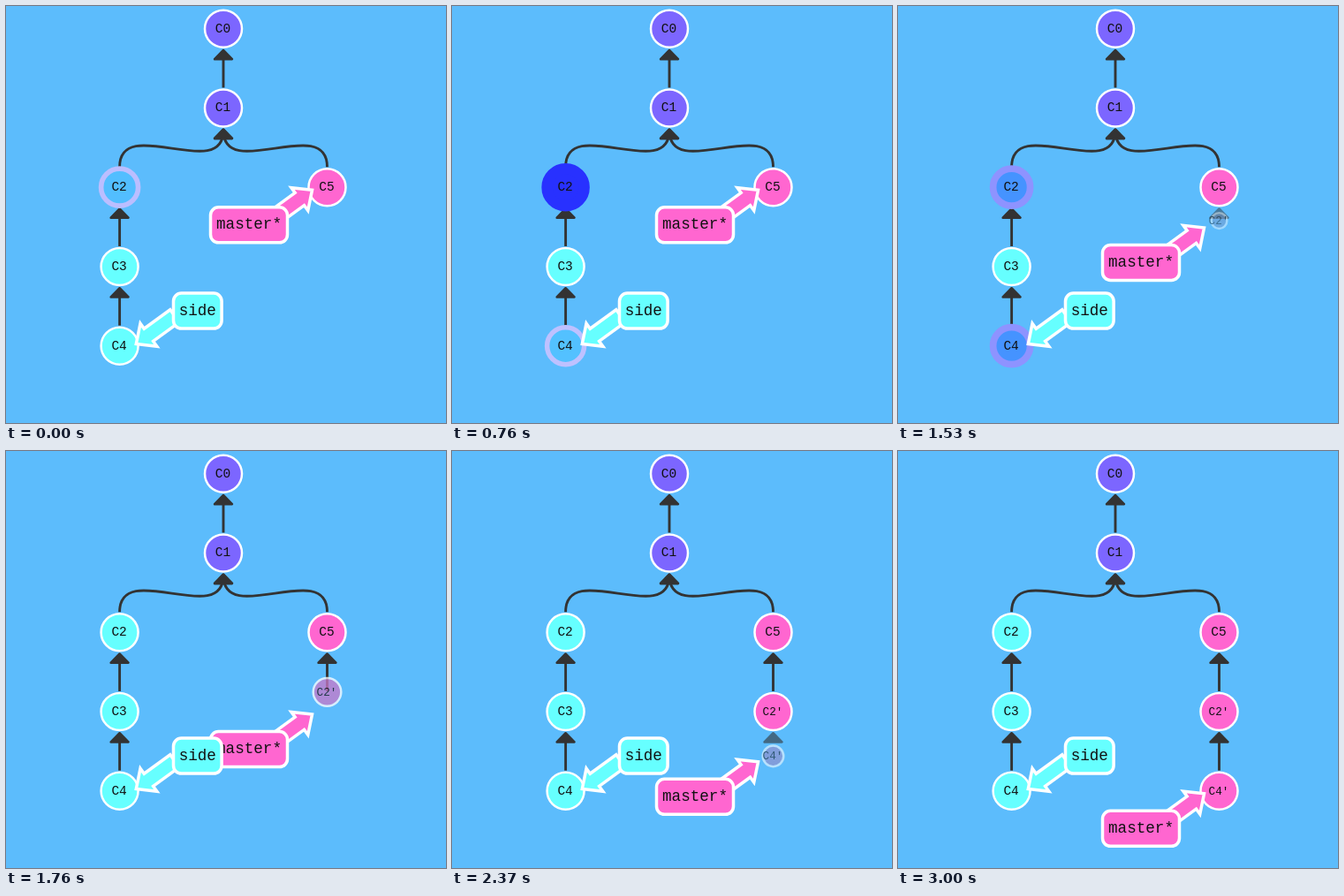
An HTML page for the animation above (4010 ms loop, 498 by 472 pixels).

```html
<!DOCTYPE html>
<html lang="en">
<head>
<meta charset="utf-8">
<title>Commit tree</title>
<style>
  html, body { margin: 0; width: 100%; height: 100%; overflow: hidden; background: #5cbcfc; }
  svg { display: block; width: 498px; height: 472px; }
  text { font-family: "Courier New", "Liberation Mono", monospace; text-anchor: middle; fill: #111; }
</style>
</head>
<body>
<svg id="stage" viewBox="0 0 498 472"></svg>
<script>
const LOOP = 4010;
const ROW = 89.75, TOP = 25.7;
const LEFT = 128.6, MID = 246, RIGHT = 363.5;
const R = 21, LINE = 2.5;
const PURPLE = [124, 102, 255], CYAN = [102, 255, 255], PINK = [255, 102, 208];
const TEAL = [36, 178, 178], BLUE = [40, 49, 255], WHITE = [255, 255, 255];

// Steady picture rate inside each active stretch: start, end, intervals.
const STRETCHES = [[70, 300, 3], [600, 1070, 6], [1370, 1840, 6], [1910, 2370, 6], [2450, 2920, 6], [3000, 3000, 0]];
const GLOW = 500, MOVE = 400, BOUNCE = 800, LAG = 5;
const GLOW_A = -195, GLOW_B = 570, BIRTH_A = 1336, BIRTH_B = 2147;

const stage = document.getElementById('stage');
const rowY = k => TOP + ROW * k;
const clamp = n => Math.min(1, Math.max(0, n));
const mix = (a, b, p) => a + (b - a) * p;
const rgb = c => `rgb(${c.map(Math.round).join()})`;
const mixColor = (a, b, p) => rgb(a.map((v, i) => mix(v, b[i], p)));

function add(parent, tag, attrs, label) {
  const el = document.createElementNS('http://www.w3.org/2000/svg', tag);
  set(el, attrs);
  if (label) el.textContent = label;
  return parent.appendChild(el);
}

function set(el, attrs) {
  for (const key in attrs) el.setAttribute(key, attrs[key]);
}

function easeInOut(n) {
  if (n <= 0 || n >= 1) return clamp(n);
  const q = 0.48 - n / 1.04;
  const root = Math.sqrt(0.1734 + q * q);
  const s = Math.cbrt(root - q) + Math.cbrt(-root - q) + 0.5;
  return (1 - s) * 3 * s * s + s * s * s;
}

function bounce(n) {
  n = clamp(n) * 2.75;
  if (n < 1) return n * n;
  if (n < 2) return (n - 1.5) ** 2 + 0.75;
  if (n < 2.5) return (n - 2.25) ** 2 + 0.9375;
  return (n - 2.625) ** 2 + 0.984375;
}

function snap(t) {
  let out = 0;
  for (const [from, to, count] of STRETCHES) {
    if (t < from) break;
    const step = count ? (to - from) / count : 1;
    out = from + step * Math.min(count, Math.floor((t - from) / step + 0.07));
  }
  return Math.round(out / 10) * 10;
}

function makeEdge(x1, y1, x2, y2) {
  const g = add(stage, 'g', { stroke: '#333', 'stroke-width': 2.9, fill: 'none' });
  const tip = y2 + R + 3.2;
  const line = add(g, 'path', { d: edgePath(x1, y1, x2, tip) });
  add(g, 'path', {
    d: `M${x2} ${tip}l10 10.3h-20z`, fill: '#333', 'stroke-width': 2.4, 'stroke-linejoin': 'round'
  });
  return { g, line, x: x1, tip };
}

function edgePath(x1, y1, x2, tip) {
  const tail = y1 - R - 2;
  return x1 === x2
    ? `M${x1} ${tail}V${tip + 2}`
    : `M${x1} ${tail}C${x1} ${tail - 60} ${x2} ${tip + 60} ${x2} ${tip + 1}`;
}

function makeNode(name, x, row, color) {
  const g = add(stage, 'g', { transform: `translate(${x} ${rowY(row)})` });
  const circle = add(g, 'circle', { r: R, fill: rgb(color), stroke: '#fff', 'stroke-width': LINE });
  add(g, 'text', { x: -0.5, y: 4, 'font-size': name.length > 2 ? 12.7 : 14.5 }, name);
  return { g, circle, x, row };
}

function makeLabel(name, x, y, width, tipX, tipY, side, color) {
  const g = add(stage, 'g', { fill: rgb(color), stroke: '#fff', 'stroke-width': 3.5 });
  const ux = 0.809 * side, uy = -0.588 * side;
  const at = (back, off) => `${tipX - ux * back - uy * off} ${tipY - uy * back + ux * off}`;
  const arrow = [[0, 0], [17.5, 16], [17.5, 8.8], [54, 8.8], [54, -8.8], [17.5, -8.8], [17.5, -16]];
  add(g, 'path', { d: 'M' + arrow.map(p => at(...p)).join('L') + 'z' });
  add(g, 'rect', { x: x - width / 2, y: y - 20, width, height: 40, rx: 9 });
  add(g, 'text', { x, y: y + 4.4, 'font-size': 17.6, style: 'stroke:none' }, name);
  return g;
}

makeEdge(MID, rowY(1), MID, rowY(0));
makeEdge(LEFT, rowY(2), MID, rowY(1));
makeEdge(RIGHT, rowY(2), MID, rowY(1));
makeEdge(LEFT, rowY(3), LEFT, rowY(2));
makeEdge(LEFT, rowY(4), LEFT, rowY(3));
const edgeA = makeEdge(RIGHT, rowY(3), RIGHT, rowY(2));
const edgeB = makeEdge(RIGHT, rowY(4), RIGHT, rowY(3));

const copyB = makeNode("C4'", RIGHT, 4, PINK);
const copyA = makeNode("C2'", RIGHT, 3, PINK);
makeNode('C0', MID, 0, PURPLE);
makeNode('C1', MID, 1, PURPLE);
const c2 = makeNode('C2', LEFT, 2, CYAN);
makeNode('C3', LEFT, 3, CYAN);
const c4 = makeNode('C4', LEFT, 4, CYAN);
makeNode('C5', RIGHT, 2, PINK);

const master = makeLabel('master*', 275, 247.8, 87, 346.5, 208.3, 1, PINK);
makeLabel('side', 216.8, 345.1, 54.6, 147.3, 382.6, -1, CYAN);

function glow(node, p) {
  set(node.circle, {
    fill: mixColor(CYAN, BLUE, p),
    stroke: mixColor(WHITE, BLUE, p),
    'stroke-width': LINE * (1 + 4 * p)
  });
}

function birth(node, edge, p, slide) {
  set(node.g, { transform: `translate(${node.x} ${rowY(node.row - 1 + p)})`, opacity: p });
  set(node.circle, { r: R * p, fill: mixColor(TEAL, PINK, p) });
  set(edge.g, { opacity: slide });
  set(edge.line, { d: edgePath(edge.x, Math.max(rowY(node.row - 1 + slide), edge.tip + R + 6), edge.x, edge.tip) });
}

function draw(t) {
  const slideA = easeInOut((t - BIRTH_A) / MOVE);
  const slideB = easeInOut((t - BIRTH_B) / MOVE);
  glow(c2, easeInOut((t - GLOW_A) / GLOW) * (1 - slideA));
  glow(c4, easeInOut((t - GLOW_B) / GLOW) * (1 - slideA));
  birth(copyA, edgeA, bounce((t - BIRTH_A - LAG) / BOUNCE), slideA);
  birth(copyB, edgeB, bounce((t - BIRTH_B - LAG) / BOUNCE), slideB);
  set(master, { transform: `translate(0 ${ROW * (slideA + slideB)})` });
}

const begin = performance.now();
function tick() {
  draw(snap((performance.now() - begin) % LOOP));
  requestAnimationFrame(tick);
}
tick();
</script>
</body>
</html>
```
